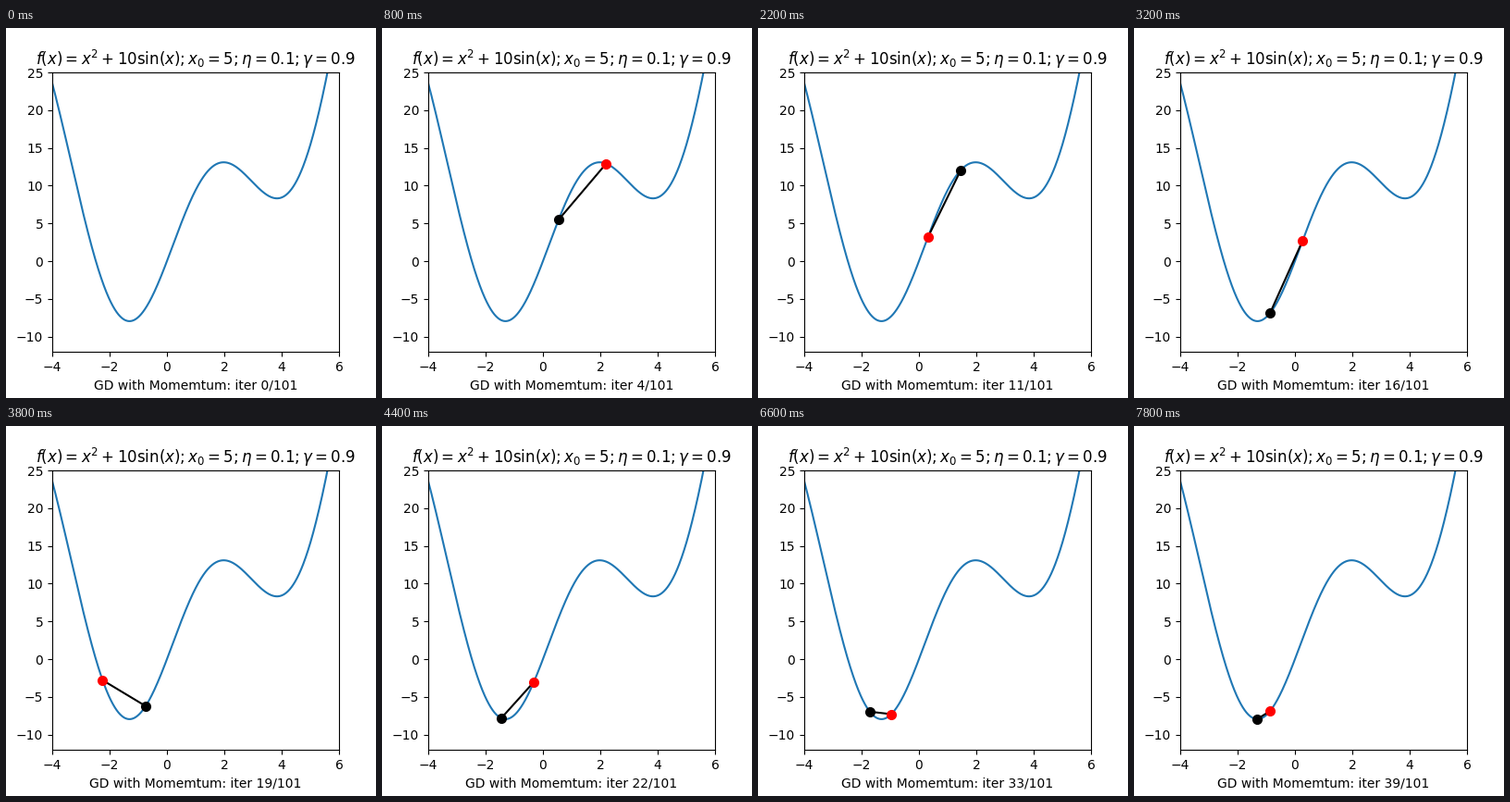
These frames come from a looping animation (400 by 400 pixels, 8000 ms). A matplotlib script:

```python
import matplotlib.pyplot as plt
import numpy as np
from matplotlib.animation import FuncAnimation

START, ETA, GAMMA = -5.0, 0.1, 0.9
TOTAL, FRAMES = 101, 40


def cost(x):
    return x**2 + 10 * np.sin(x)


def grad(x):
    return 2 * x + 10 * np.cos(x)


def momentum_path(x, steps):
    path, v = [x], 0.0
    for _ in range(steps):
        v = GAMMA * v + ETA * grad(x)
        x -= v
        path.append(x)
    return np.array(path)


xs = momentum_path(START, FRAMES)
ys = cost(xs)

fig, ax = plt.subplots(figsize=(4, 4), dpi=100)
fig.subplots_adjust(left=0.125, right=0.9, bottom=0.125, top=0.88)

grid = np.linspace(-5, 7, 1000)
ax.plot(grid, cost(grid))
prev_dot, = ax.plot([], [], "ko", markersize=7)
step_line, = ax.plot([], [], "k-")
dot, = ax.plot([], [], "ro", markersize=7)

ax.axis([-4, 6, -12, 25])
ax.set_xticks(range(-4, 7, 2))
ax.set_yticks(range(-10, 26, 5))
ax.set_title(r"$f(x) = x^2 + 10\sin(x); x_0 = 5; \eta = 0.1; \gamma = 0.9$")


def update(i):
    j = max(i - 1, 0)
    prev_dot.set_data(xs[j:i], ys[j:i])
    step_line.set_data(xs[j:i + 1], ys[j:i + 1])
    dot.set_data(xs[i:i + 1], ys[i:i + 1])
    ax.set_xlabel(f"GD with Momemtum: iter {i}/{TOTAL}")
    return prev_dot, step_line, dot


anim = FuncAnimation(fig, update, frames=FRAMES, interval=200,
                     repeat=True, repeat_delay=0, blit=False)
plt.show()
```
